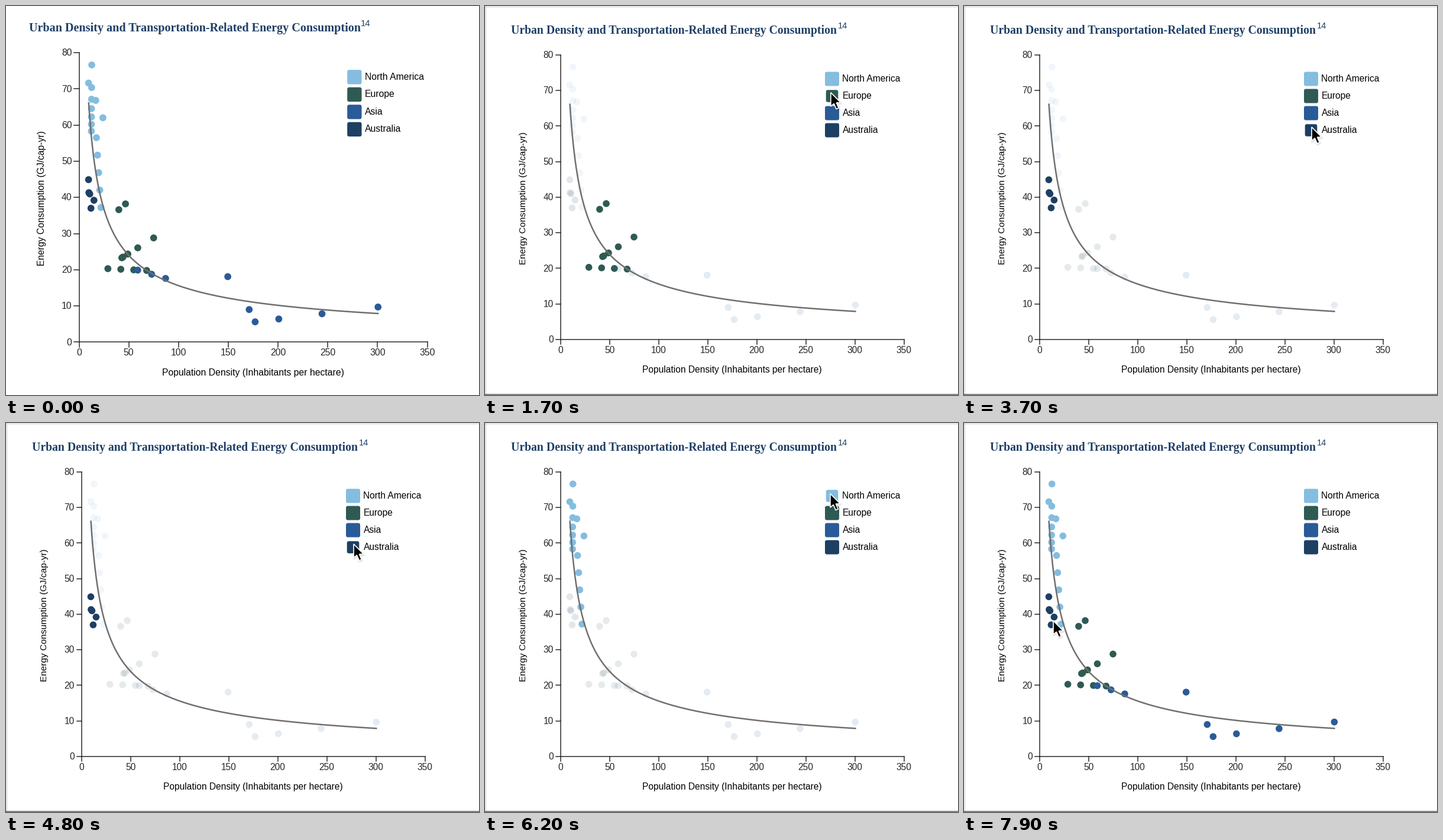
Recreate the animation shown at these times as a matplotlib script. Size 800 by 659 pixels, loop 8 s.

```python
import numpy as np
import matplotlib.pyplot as plt
from matplotlib.animation import FuncAnimation
from matplotlib.patches import Circle, FancyBboxPatch, Polygon, Rectangle
from matplotlib.transforms import Affine2D

W, H, DPI = 800, 659, 64
FRAMES, STEP = 80, 100
PT = 72 / DPI
SANS, SERIF = "Liberation Sans", "Liberation Serif"
NAVY, INK, ORANGE = "#1e3f66", "#262626", "#f5991f"
X0, Y0, X1, Y1 = 127.5, 565, 708.5, 82.8


def sx(v):
    return X0 + (X1 - X0) * v / 350


def sy(v):
    return Y0 + (Y1 - Y0) * v / 80


def run(n, a, b, power=1):
    """n cities from a to b, given as (density, energy)."""
    u = np.linspace(0, 1, n)[:, None] ** power
    return np.array(a) * (1 - u) + np.array(b) * u


GROUPS = {
    "North America": ("#84bde0", [run(5, (17.5, 56.5), (22, 37.2)),
                                  run(3, (9.6, 71.6), (24, 62)),
                                  run(7, (12.8, 76.6), (12.4, 58.3), 0.6)]),
    "Europe": ("#2f5a53", [run(5, (43, 23.3), (75, 28.8), 2.4),
                           run(4, (29, 20.3), (68, 19.8)),
                           run(2, (40, 36.6), (46.7, 38.2))]),
    "Asia": ("#295b99", [run(3, (59, 19.9), (87, 17.6)),
                         run(2, (149.5, 18.1), (171, 9)),
                         run(4, (177, 5.6), (300.5, 9.7), 1.5)]),
    "Australia": ("#1d3f63", [run(3, (9.6, 44.9), (12, 37)),
                              run(2, (9.9, 41.3), (15, 39.2))]),
}
CALGARY = 2
SWATCH_X = 587
SWATCH_Y = [123.5 + 29 * k for k in range(4)]

# Pointer stops: time in ms, x and y of the tip
STOPS = np.array([
    (500, 694, 212), (1000, 583, 143), (2500, 587, 151), (3700, 588, 205),
    (5000, 588, 205), (5500, 586, 119), (6600, 583, 120), (7000, 164, 291),
    (7900, 151, 335)])


def pointer(t):
    """Eased position between the surrounding stops."""
    k = int(np.clip(np.searchsorted(STOPS[:, 0], t) - 1, 0, len(STOPS) - 2))
    (t0, *a), (t1, *b) = STOPS[k], STOPS[k + 1]
    u = np.clip((t - t0) / (t1 - t0), 0, 1)
    u = u * u * (3 - 2 * u)
    return np.array(a) + (np.array(b) - np.array(a)) * u


def hovered(t):
    """Index of the legend swatch under the pointer, or None."""
    x, y = pointer(t)
    if t < 500 or abs(x - SWATCH_X) > 13:
        return None
    for k, cy in enumerate(SWATCH_Y):
        if abs(y - cy) <= 14.5:
            return k
    return None


def fade_levels():
    """Strength of each group per frame, easing towards its hover state."""
    level, rows = np.ones(4), []
    for i in range(FRAMES):
        h = hovered(i * STEP)
        goal = np.ones(4) if h is None else np.eye(4)[h]
        level = level + np.clip(goal - level, -0.5, 0.5)
        rows.append(level)
    return rows


LEVELS = fade_levels()

fig = plt.figure(figsize=(W / DPI, H / DPI), dpi=DPI, facecolor="white")
ax = fig.add_axes([0, 0, 1, 1])
ax.axis("off")
ax.set_xlim(0, W)
ax.set_ylim(H, 0)

labels = []


def text(x, y, s, px=15.5, color="black", font=SANS, **kw):
    label = ax.text(x, y, s, fontsize=px * PT, color=color, family=font,
                    **kw)
    labels.append((label, px * PT))
    return label


def line(xs, ys, color=INK, px=1.5, **kw):
    ax.plot(xs, ys, color=color, lw=px * PT, **kw)


def rounded(x, y, w, h, r, color, **kw):
    style = f"round,pad=0,rounding_size={r}"
    return ax.add_patch(FancyBboxPatch((x, y), w, h, boxstyle=style,
                                       fc=color, ec="none", **kw))


# Window edges
EDGE = "#c9c9c9"
for x in (0.5, W - 0.5):
    line([x, x], [0, H], EDGE, 1)
line([0, W], [0.5, 0.5], EDGE, 1)
line([0, W], [657.7, 657.7], "#6e6e6e", 1.6)

# Titles
text(44.5, 47.5, "Urban Density and Transportation-Related Energy Consumption",
     19.8, NAVY, SERIF, weight="bold")
text(597, 38.2, "14", 14.6, NAVY)
text(417.5, 620.5, "Population Density (Inhabitants per hectare)",
     ha="center")
text(69.5, 325.5, "Energy Consumption (GJ/cap-yr)", 15.35, rotation=90,
     rotation_mode="anchor", ha="center", va="baseline")

# Axes
line([X0, X0], [Y1, Y0])
line([X0, X1], [Y0, Y0])
for v in range(0, 81, 10):
    line([X0 - 8, X0], [sy(v)] * 2)
    text(115.7, sy(v) + 5.2, str(v), color=INK, ha="right")
for v in range(0, 351, 50):
    line([sx(v)] * 2, [Y0, Y0 + 8])
    text(sx(v), 587.7, str(v), color=INK, ha="center")

# Cities, legend and trend
dots, swatches = [], []
for (name, (color, runs)), cy in zip(GROUPS.items(), SWATCH_Y):
    dots.append([ax.add_patch(Circle((sx(d), sy(e)), 5.8, fc=color,
                                     ec="none", zorder=3))
                 for d, e in np.vstack(runs)])
    swatches.append(rounded(SWATCH_X - 12, cy - 12, 24, 24, 3, color))
    text(604.5, cy + 4.3, name)

density = np.geomspace(9.7, 300.5, 200)
line(sx(density), sy(66.1 * (density / 9.7) ** -0.6187), "#6f6f6f", 2.5,
     zorder=4)

# Tooltip and pointer share one offset, the pointer tip
shift = Affine2D()
local = shift + ax.transData
tip = []


def tip_box(x, y, w, h, r, color, alpha=1.0):
    tip.append(rounded(x, y, w, h, r, color, alpha=alpha, zorder=6,
                       transform=local))


def tip_text(x, y, s, bold=False, ha="left"):
    tip.append(text(x, y, s, 15.25, "#333333", ha=ha, zorder=7,
                    weight="bold" if bold else "normal", transform=local))


BX, BY, BW, BH = 17, -15, 285, 100
for g in range(5, 0, -1):
    tip_box(BX - g, BY - g + 1.5, BW + 2 * g, BH + 2 * g, 6 + g, "black",
            0.014)
tip_box(BX, BY, BW, BH, 6, "white", 0.9)
tip_box(BX, BY, BW, 38, 6, "#ebe9ea")
tip.append(ax.add_patch(Rectangle((BX, BY + 20), BW, 18, fc="#ebe9ea",
                                  ec="none", zorder=6, transform=local)))
tip_text(29, 10, "Calgary", bold=True)
ROWS = [("Energy", "47.1", "GJ/cap-yr", 220.6),
        ("Density", "20.8", "Inhabitants per hectare", 130.3)]
for k, (name, value, unit, vx) in enumerate(ROWS):
    y = 44.5 + 31 * k
    tip_text(29, y, name)
    tip_text(vx, y, value, bold=True, ha="right")
    tip_text(291, y, unit, ha="right")

ARROW = np.array([(0, 0), (0, 23.5), (5.3, 18.8), (9.3, 28), (13.4, 26.2),
                  (9.5, 17.3), (16.8, 17)])
arrow = [ax.add_patch(Polygon(ARROW + (0.5, 1.5), fc="black", ec="black",
                              lw=w * PT, alpha=0.04, joinstyle="round",
                              zorder=8, transform=local))
         for w in (5, 3, 1)]
arrow.append(ax.add_patch(Polygon(ARROW, fc="black", ec="white", lw=1.7 * PT,
                                  joinstyle="miter", zorder=9,
                                  transform=local)))


def draw(i):
    t = i * STEP

    # Opening zoom-out
    k = max(0, 1 - i / 3)
    ax.set_xlim(5.67 * k, W - 5.2 * k)
    ax.set_ylim(H - 5.9 * k, 5.1 * k)
    for label, size in labels:
        label.set_fontsize(size * (1 + 0.0155 * k))

    shift.clear().translate(*pointer(t))
    for part in arrow:
        part.set_visible(t >= 500)

    for group, level in zip(dots, LEVELS[i]):
        for dot in group:
            dot.set_alpha(0.12 + 0.88 * level)

    h = hovered(t)
    for n, (box, cy) in enumerate(zip(swatches, SWATCH_Y)):
        r = 10.3 if n == h else 12
        box.set_bounds(SWATCH_X - r, cy - r, 2 * r, 2 * r)

    show = 7000 <= t < 7700
    for part in tip:
        part.set_visible(show)
    color = GROUPS["North America"][0]
    dots[0][CALGARY].set_facecolor(ORANGE if show else color)
    return []


anim = FuncAnimation(fig, draw, frames=FRAMES, interval=STEP,
                     init_func=lambda: draw(0), repeat=True, repeat_delay=0)
plt.show()
```
